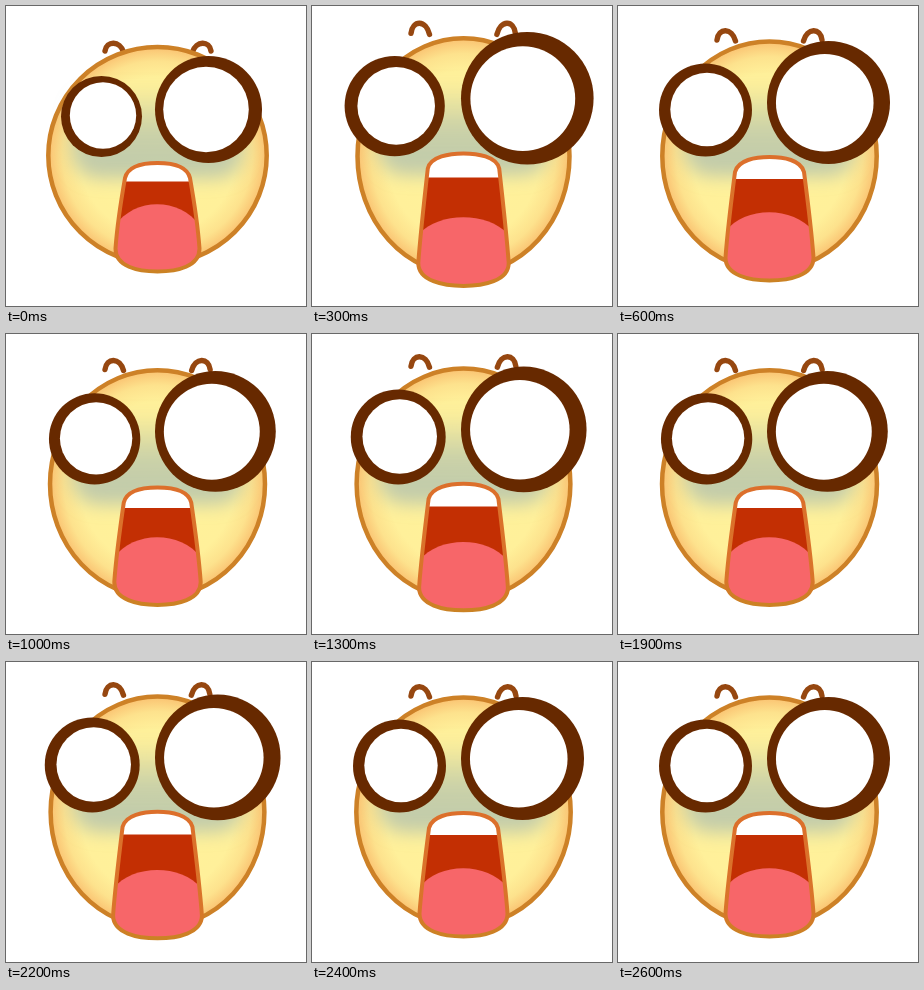
Recreate the animation shown at these times as an HTML page. Size 300x300 px, loop 2700 ms.

```html
<!DOCTYPE html>
<html lang="en">
<head>
<meta charset="utf-8">
<title>Shocked face</title>
<style>
  html, body { margin: 0; width: 100%; height: 100%; overflow: hidden; background: #fff; }
  svg { display: block; width: 300px; height: 300px; }
</style>
</head>
<body>
<svg viewBox="0 0 300 300">
  <defs>
    <radialGradient id="skin">
      <stop offset="0" stop-color="#fff39a"/>
      <stop offset=".72" stop-color="#fff09a"/>
      <stop offset=".87" stop-color="#fde28d"/>
      <stop offset="1" stop-color="#fac271"/>
    </radialGradient>
    <linearGradient id="pale" x2="0" y2="1">
      <stop offset="0" stop-color="#9db5b4" stop-opacity="0"/>
      <stop offset=".5" stop-color="#9db5b4" stop-opacity=".55"/>
      <stop offset="1" stop-color="#9db5b4" stop-opacity=".66"/>
    </linearGradient>
    <linearGradient id="lipline" x2="0" y2="1">
      <stop offset="0" stop-color="#dc6f2b"/>
      <stop offset=".75" stop-color="#d9742a"/>
      <stop offset="1" stop-color="#cb8224"/>
    </linearGradient>
    <filter id="soft" x="-20%" y="-40%" width="140%" height="180%">
      <feGaussianBlur stdDeviation="9"/>
    </filter>
    <clipPath id="inside"><path id="lips"/></clipPath>
  </defs>
  <g fill="none" stroke="#964710" stroke-width="5.4" stroke-linecap="round">
    <path id="browL"/>
    <path id="browR"/>
  </g>
  <ellipse id="head" fill="url(#skin)" stroke="#cd8127" stroke-width="4.5"/>
  <rect id="shade" x="65" width="173" height="92" rx="28" fill="url(#pale)" filter="url(#soft)"/>
  <g fill="#672900"><circle id="rimL"/><circle id="rimR"/></g>
  <g fill="#fff"><circle id="eyeL"/><circle id="eyeR"/></g>
  <g clip-path="url(#inside)">
    <rect width="300" height="300" fill="#c32f03"/>
    <rect id="teeth" width="300" fill="#fff"/>
    <path id="tongue" fill="#f76669"/>
  </g>
  <path id="mouth" fill="none" stroke="url(#lipline)" stroke-width="4"/>
</svg>
<script>
const STEP = 100;
// Stretch of the face and of the mouth per step: 0 is at rest, 1 is the peak.
const POSES = [
  [0, 0], [.43, .3], [1, 1], [.8, .8], [.58, .6],
  [.4, .4], [.5, .5], [.56, .56], [.5, .5]
];

const $ = id => document.getElementById(id);
const set = (id, attrs) => {
  for (const key in attrs) $(id).setAttribute(key, attrs[key]);
};
const circle = (id, cx, cy, r) => set(id, { cx, cy, r });
const ellipse = (id, cx, cy, rx, ry) => set(id, { cx, cy, rx, ry });

function drawFace(k) {
  ellipse('head', 151.5, 149.5 + k, 109.2 - 4 * k, 108.5 + 12 * k);
  set('shade', { y: 80 - 4 * k });

  circle('rimL', 95.5 - 16 * k, 110.5 - 13 * k, 40.5 + 12 * k);
  circle('eyeL', 97 - 16 * k, 109.5 - 12 * k, 33.2 + 7 * k);
  circle('rimR', 202.5 + 16 * k, 103.5 - 14 * k, 53.5 + 16 * k);
  circle('eyeR', 200 + 13.5 * k, 103.5 - 13.5 * k, 42.8 + 12 * k);

  const y = 45 - 22 * k, top = 34.5 - 26 * k;
  const brow = x => `M${x(99)} ${y} C${x(100.5)} ${top} ${x(114)} ${top} ${x(117.5)} ${y + 1}`;
  set('browL', { d: brow(x => x) });
  set('browR', { d: brow(x => 304 - 2 * k - x) });
}

function drawMouth(k) {
  const cx = 151.5, top = 157 - 12 * k, low = 265.5 + 18 * k;
  const neck = 32.5 + 4 * k, jaw = 42 + 4 * k;
  const shoulder = top + 15, corner = low - 23;
  const d = `M${cx - neck} ${shoulder}
    C${cx - neck + 3} ${top + 3} ${cx - 14} ${top} ${cx} ${top}
    S${cx + neck - 3} ${top + 3} ${cx + neck} ${shoulder}
    Q${cx + jaw - 2} ${corner - 28} ${cx + jaw} ${corner}
    C${cx + jaw} ${low - 5} ${cx + 20} ${low} ${cx} ${low}
    S${cx - jaw} ${low - 5} ${cx - jaw} ${corner}
    Q${cx - jaw + 2} ${corner - 28} ${cx - neck} ${shoulder}Z`;
  set('lips', { d });
  set('mouth', { d });
  set('teeth', { height: 175.5 - 5 * k });

  const tip = 198 + 19 * k, side = 222 + 7 * k;
  set('tongue', {
    d: `M${cx - 44} ${side} C${cx - 25} ${tip - 7} ${cx + 23} ${tip - 8} ${cx + 44} ${side} V300 H${cx - 44}Z`
  });
}

const start = performance.now();
let shown = -1;

function tick() {
  const step = Math.floor((performance.now() - start) / STEP) % POSES.length;
  if (step !== shown) {
    shown = step;
    const [face, mouth] = POSES[step];
    drawFace(face);
    drawMouth(mouth);
  }
  requestAnimationFrame(tick);
}
tick();
</script>
</body>
</html>
```
